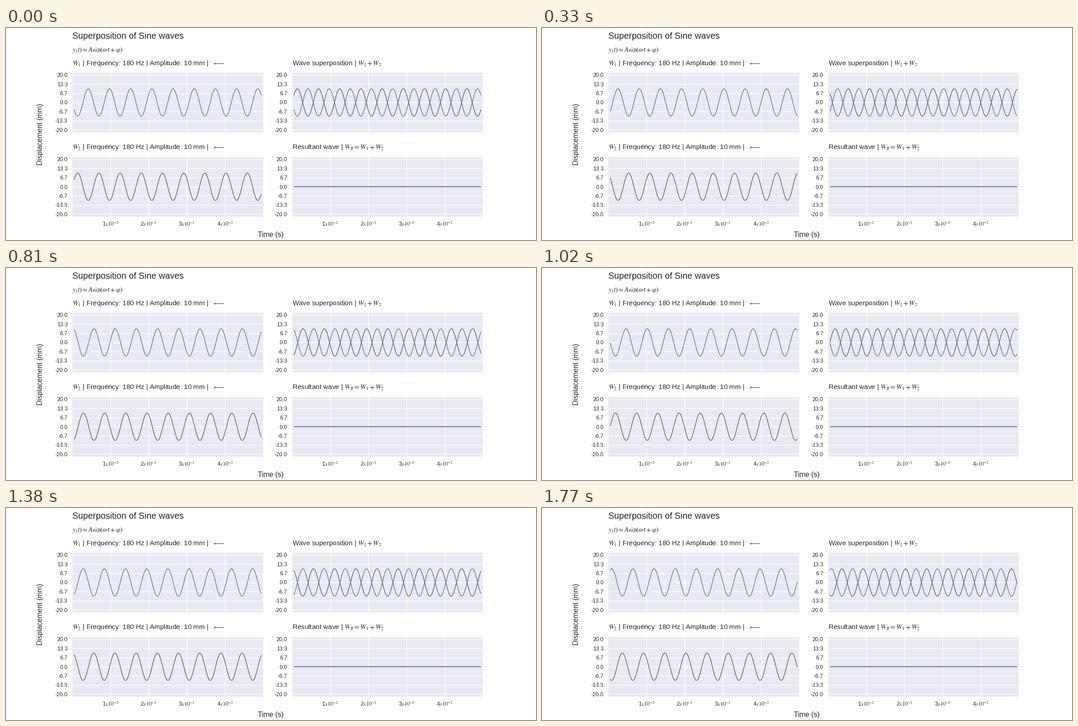
A matplotlib script that plays this animation: 1183 px wide and 473 px high, repeating every 1.8 s.

```python
import matplotlib.pyplot as plt
import numpy as np
from matplotlib.animation import FuncAnimation

WIDTH, HEIGHT, DPI = 1183, 473, 100
FRAMES, INTERVAL = 60, 30
FREQ, AMP = 180, 10
STEP = 1.5e-4                      # seconds of travel per frame
OMEGA = 2 * np.pi * FREQ

INK, PANEL = "#262626", "#e8e9f1"
BLUE, GREY, DARK = "#6b7ec3", "#6a6c84", "#50526f"

plt.rcParams.update({
    "font.family": "Liberation Sans",
    "mathtext.fontset": "stix",
    "text.color": INK,
    "axes.unicode_minus": False,
})

fig = plt.figure(figsize=(WIDTH / DPI, HEIGHT / DPI), dpi=DPI, facecolor="white")


def pt(px):
    return px * 72 / DPI


def label(x, y, text, size, **kw):
    """Place text with its baseline at pixel (x, y), measured from the top left."""
    kw.setdefault("va", "baseline")
    return fig.text(x / WIDTH, 1 - y / HEIGHT, text, fontsize=pt(size), **kw)


def panel(left, top, show_time):
    w, h = 425.7, 133
    ax = fig.add_axes([left / WIDTH, 1 - (top + h) / HEIGHT, w / WIDTH, h / HEIGHT],
                      facecolor=PANEL)
    ax.set(xlim=(0, 0.05), ylim=(-21.77, 21.77))
    ax.spines[:].set_visible(False)
    ax.set_axisbelow(True)
    ax.grid(color="white", lw=pt(1.4))
    ax.tick_params(length=0, labelleft=False, labelbottom=False)
    ax.set_xticks(np.arange(1, 5) / 100)
    levels = np.linspace(20, -20, 7)
    ax.set_yticks(levels)
    for v in levels:
        y = top + h / 2 - v * h / 43.54
        label(left - 10.7, y + 4.4, f"{v:.1f}", 12.1, ha="right")
    if show_time:
        for k in range(1, 5):
            label(left + k * w / 5, 441.5, f"{k}$x10^{{-2}}$", 12.1, ha="center")
    return ax


def wave(ax, color):
    return ax.plot([], [], color=color, lw=pt(1.6), solid_capstyle="round")[0]


ax1 = panel(148.2, 99.6, False)
ax2 = panel(148.2, 287.6, True)
ax_both = panel(638.5, 99.6, False)
ax_sum = panel(638.5, 287.6, True)

label(147.5, 24, "Superposition of Sine waves", 19.7)
label(148.5, 53, r"$y_(t)=A\sin(\omega t+\varphi)$", 15.2)
info = r" | Frequency: 180 Hz | Amplitude: 10 mm |  $\longleftarrow$"
label(148.5, 82.5, "$W_1$" + info, 15.25)
label(148.5, 270, "$W_2$" + info, 15.25)
label(638.7, 82.5, "Wave superposition | $W_1+W_2$", 15.25)
label(638.7, 270, "Resultant wave | $W_R=W_1+W_2$", 15.25)
label(591.3, 465.5, "Time (s)", 15.85, ha="center")
label(77, 237, "Displacement (mm)", 15.85, rotation=90, ha="center", va="center")

t = np.linspace(0.0005, 0.0495, 500)
first = [wave(ax1, BLUE), wave(ax_both, BLUE)]
second = [wave(ax2, GREY), wave(ax_both, GREY)]
total = wave(ax_sum, DARK)


def draw(i):
    phase = OMEGA * (t + i * STEP)
    w1 = AMP * np.sin(phase + np.pi)
    w2 = AMP * np.sin(phase)
    for line in first:
        line.set_data(t, w1)
    for line in second:
        line.set_data(t, w2)
    total.set_data(t, w1 + w2)
    return [*first, *second, total]


anim = FuncAnimation(fig, draw, frames=FRAMES, interval=INTERVAL, init_func=lambda: draw(0),
                     repeat=True, repeat_delay=0, blit=False)
plt.show()
```
